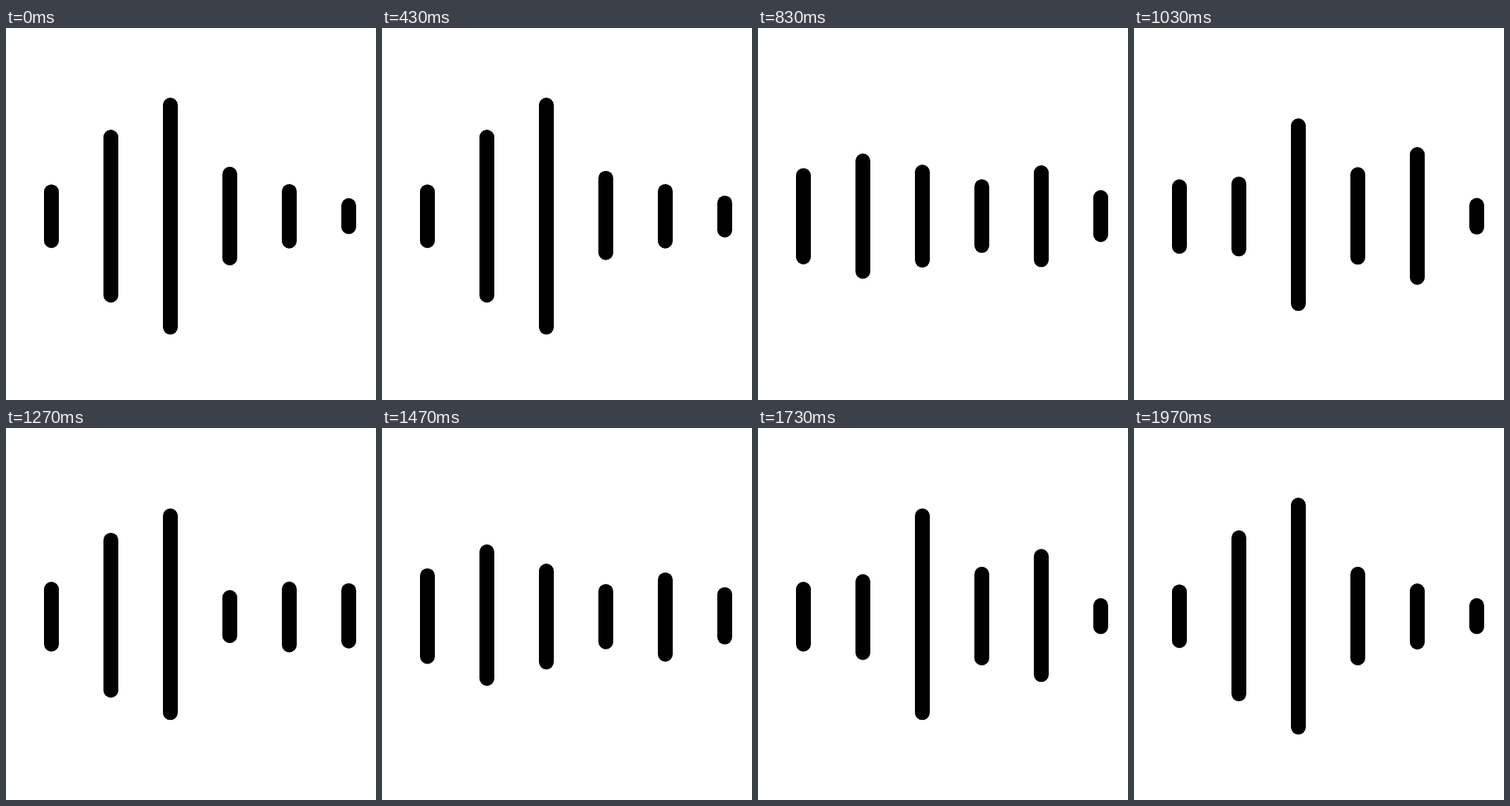
An HTML page for the animation above (2010 ms loop, 448x450 px).

```html
<!DOCTYPE html>
<html lang="en">
<head>
<meta charset="utf-8">
<title>Sound bars</title>
<style>
  html, body { margin: 0; width: 100%; height: 100%; overflow: hidden; background: #fff; }
  svg { display: block; width: 100%; height: 100%; }
</style>
</head>
<body>
<svg id="stage" viewBox="0 0 448 450"></svg>
<script>
const LOOP = 2010, FPS = 30, LAST = 59;
const SWING = 10, WIDTH = 18;

// top and bottom at rest, how far each end moves inwards, first moving step
const bars = [
  { top: 189.2, bottom: 266.2, shift: -19.8, start: 15 },
  { top: 123, bottom: 332.2, shift: 57.5, start: 20 },
  { top: 84.3, bottom: 370.8, shift: 81, start: 15 },
  { top: 167.8, bottom: 287.2, shift: 30.2, start: 10 },
  { top: 188.7, bottom: 266.7, shift: -45.3, start: 20 },
  { top: 205.8, bottom: 249.3, shift: -19.4, start: 10 }
];

const svg = document.getElementById("stage");
bars.forEach((bar, i) => {
  bar.el = document.createElementNS("http://www.w3.org/2000/svg", "rect");
  bar.el.setAttribute("x", 46 + 72 * i);
  bar.el.setAttribute("width", WIDTH);
  bar.el.setAttribute("rx", WIDTH / 2);
  svg.append(bar.el);
});

const smooth = s => s * s * (3 - 2 * s);

// cubic-bezier(.5, 0, .5, 1), solved by bisection
function steep(x) {
  let lo = 0, hi = 1;
  for (let i = 0; i < 24; i++) {
    const s = (lo + hi) / 2;
    if (1.5 * s * (1 - s) + s ** 3 < x) lo = s; else hi = s;
  }
  return smooth(lo);
}

// two there-and-back swings, as a 0..1 triangle
function swing(step, start) {
  const p = (step - start) / SWING;
  return p <= 0 || p >= 4 ? 0 : 1 - Math.abs(p % 2 - 1);
}

function draw(ms) {
  const tick = Math.floor(ms / 10) * 10;
  const step = Math.min(LAST, Math.floor((tick + 4) * FPS / 1000));
  for (const { el, top, bottom, shift, start } of bars) {
    const p = swing(step, start);
    const y = top + shift * steep(p);
    el.setAttribute("y", y);
    el.setAttribute("height", bottom - shift * smooth(p) - y);
  }
}

const begin = performance.now();
function run() {
  draw((performance.now() - begin) % LOOP);
  requestAnimationFrame(run);
}
run();
</script>
</body>
</html>
```
